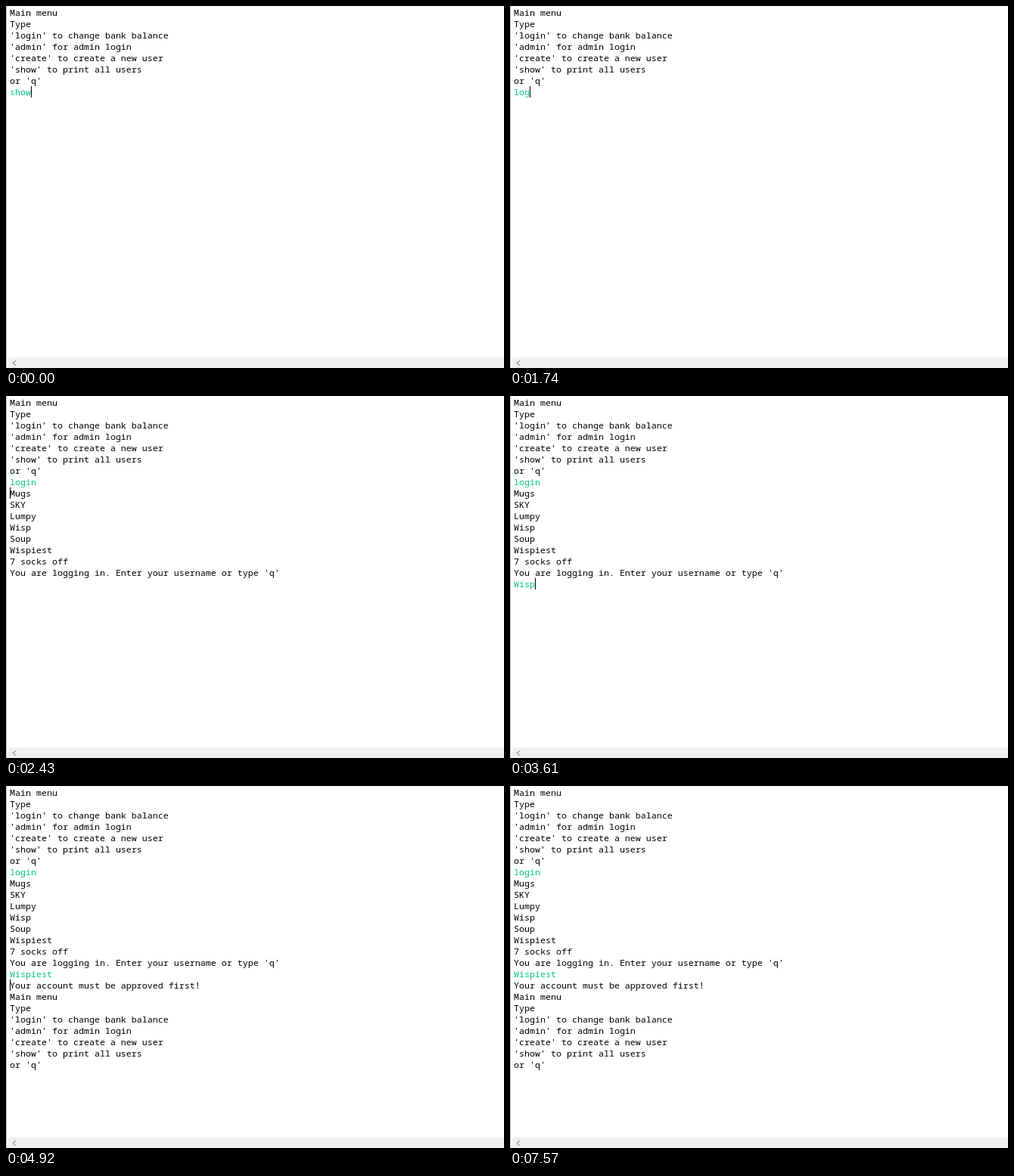
Write an HTML page that moves like this. It is 658 px wide and 479 px high and loops after 8000 ms.

```html
<!DOCTYPE html>
<html lang="en">
<head>
<meta charset="utf-8">
<title>Console session</title>
<style>
  html, body { margin: 0; width: 100%; height: 100%; overflow: hidden; background: #fff; }
  svg { display: block; width: 658px; height: 479px; }
  text { font: 11.667px "Noto Sans Mono", "DejaVu Sans Mono", monospace; fill: #000; }
  .typed { fill: #00c87d; }
</style>
</head>
<body>
<svg viewBox="0 0 658 479">
  <g shape-rendering="crispEdges">
    <rect width="1" height="479" fill="#c3c3c3"/>
    <rect x="3" y="465" width="655" height="14" fill="#f0f0f0"/>
  </g>
  <path d="M13 469.3 L9.3 472.5 L13 475.7" fill="none" stroke="#a3a3a3" stroke-width="1.5"/>
  <g id="screen"></g>
  <rect id="caret" width="1" height="15" shape-rendering="crispEdges"/>
</svg>
<script>
const LOOP = 8000, LEFT = 5, TOP = 1, CHAR = 7, LINE = 15, BASELINE = 12;
const MENU = [
  "Main menu",
  "Type",
  "'login' to change bank balance",
  "'admin' for admin login",
  "'create' to create a new user",
  "'show' to print all users",
  "or 'q'"
];
const USERS = ["Mugs", "SKY", "Lumpy", "Wisp", "Soup", "Wispiest", "7 socks off"];
const PROMPT = "You are logging in. Enter your username or type 'q'";
const COMMAND = "login", USER = "Wispiest";
const COMMAND_ROW = MENU.length;
const USER_ROW = COMMAND_ROW + USERS.length + 2;

const screen = document.getElementById("screen");
const caret = document.getElementById("caret");

// Each step: start time, caret row, caret column (-1 hides it), changed values.
const steps = [];
const step = (time, row, col, change = {}) => steps.push({ time, row, col, change });

const typeInto = (row, key, word, times, first) => times.forEach((time, i) => {
  const count = first + i;
  step(time, row, count, { [key]: word.slice(0, count) });
});

[0, 530, 660, 940, 1080].forEach((time, i) =>
  step(time, COMMAND_ROW, 4 - i, { command: "show".slice(0, 4 - i) }));
typeInto(COMMAND_ROW, "command", COMMAND, [1480, 1610, 1740, 1880, 2030], 1);
step(2300, COMMAND_ROW + 1, 0);
step(2430, COMMAND_ROW + 1, 0, { listed: true });
step(2960, COMMAND_ROW + 1, -1);
typeInto(USER_ROW, "user", USER, [3220, 3480, 3610, 3740, 3870, 4000, 4130], 2);
step(4660, USER_ROW, -1);
step(4790, USER_ROW + 1, 0);
step(4920, USER_ROW + 1, 0, { answered: true });
for (let i = 1; i <= 5; i++) step(4920 + i * 530, USER_ROW + 1, i % 2 ? -1 : 0);

function addLine(content, row, typed) {
  const line = document.createElementNS("http://www.w3.org/2000/svg", "text");
  line.setAttribute("x", LEFT);
  line.setAttribute("y", TOP + row * LINE + BASELINE);
  if (typed) line.setAttribute("class", "typed");
  line.textContent = content;
  screen.append(line);
}

function draw(index) {
  const state = Object.assign({}, ...steps.slice(0, index + 1).map(s => s.change));
  const { row, col } = steps[index];
  const lines = [...MENU, state.command];
  if (state.listed) lines.push(...USERS, PROMPT, state.user || "");
  if (state.answered) lines.push("Your account must be approved first!", ...MENU);

  screen.replaceChildren();
  lines.forEach((content, i) => addLine(content, i, i === COMMAND_ROW || i === USER_ROW));
  caret.setAttribute("visibility", col < 0 ? "hidden" : "visible");
  caret.setAttribute("x", LEFT + Math.max(col, 0) * CHAR);
  caret.setAttribute("y", TOP + row * LINE);
}

let shown = -1;
const start = performance.now();

function tick(now) {
  const time = Math.max(0, now - start) % LOOP;
  const index = steps.findLastIndex(s => s.time <= time);
  if (index !== shown) draw(shown = index);
  requestAnimationFrame(tick);
}
tick(start);
</script>
</body>
</html>
```
